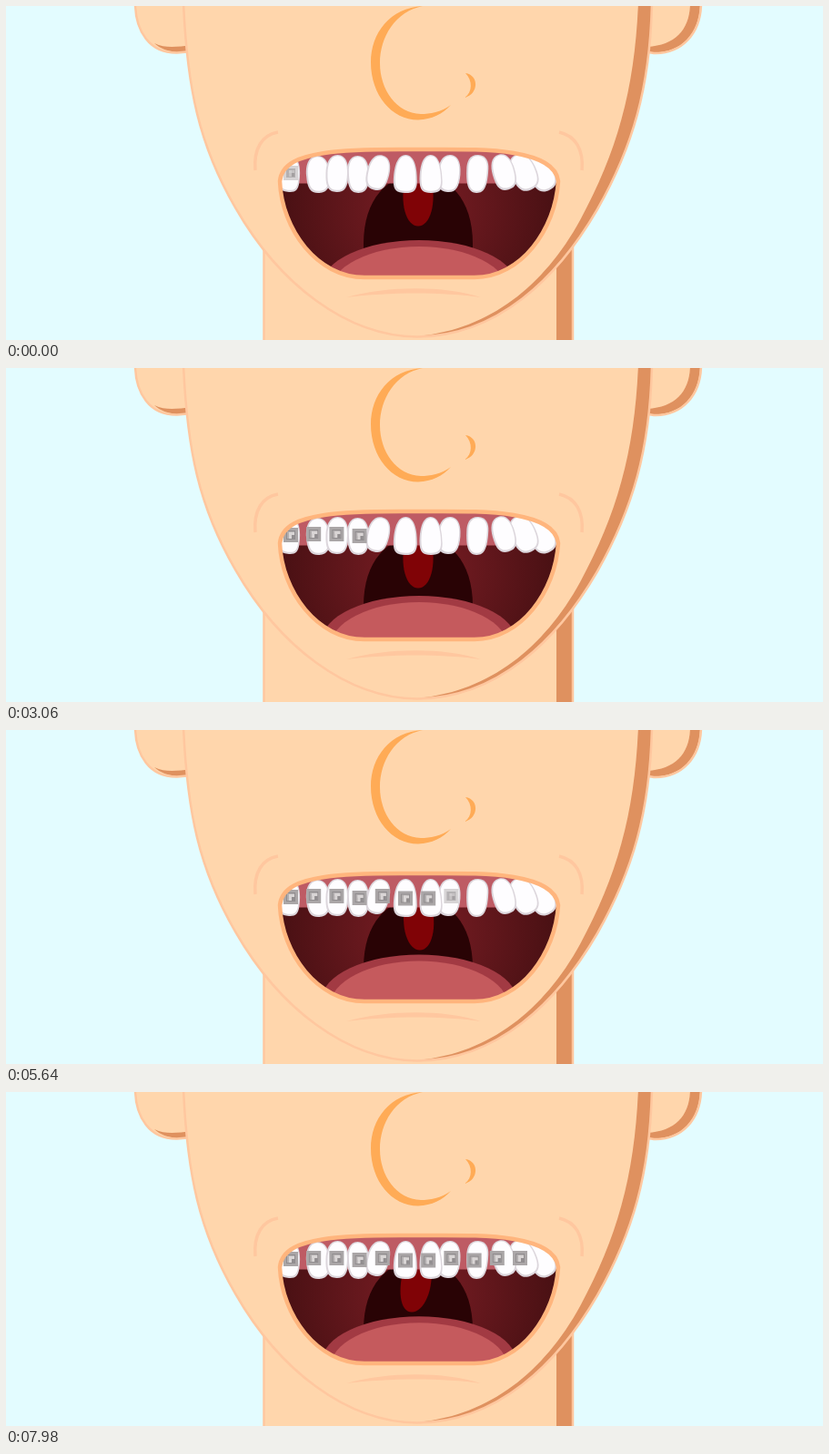
Animation, 898 px wide and 368 px high, one loop 8000 ms. Source, as an HTML page with a canvas:

```html
<!DOCTYPE html>
<html lang="en">
<head>
<meta charset="utf-8">
<title>Braces</title>
<style>
html, body { margin: 0; width: 100%; height: 100%; overflow: hidden; background: #e3fcff; }
canvas { display: block; width: 100%; height: 100%; }
</style>
</head>
<body>
<canvas id="stage" width="898" height="368"></canvas>
<script>
const ctx = document.getElementById('stage').getContext('2d');
const LOOP = 8000;
const SKIN = '#ffd6ac', LINE = '#ffc79f', SHADE = '#df915f', ORANGE = '#ffab56';
const clamp = v => Math.max(0, Math.min(1, v));
const smooth = v => v * v * (3 - 2 * v);
const P = d => new Path2D(d);

const face = P('M195 -4C199 90 212 153 252 222C300 306 374 364 452 364.5C540 364 606 300 650 224C689 155 708 90 710 -4Z');
const faceShade = P('M695 -4C691 92 672 160 631 236C591 309 531 356 455 363.5C540 364 606 300 650 224C689 155 708 90 710 -4Z');
const earLeft = P('M142 -4C142 28 158 52 188 51.5L215 49L215 -4Z');
const earLeftShade = P('M163 41C176 47 187 45 205 43L205 51L188 51C179 50 169 47 163 41Z');
const earRight = P('M764 -4C764 31 742 53 712 52L690 48L690 -4Z');
const earRightShade = P('M752 -4C752 25 737 43 705 45L705 51C742 54 763 31 763 -4Z');
const nose = P('M458 0C422 2 401 30 401 62C401 98 424 125.5 453 125.5C468 125 480 119 489 109C478 117 466 119 456 119C429 118 411 92 411 63C411 34 428 6 458 0Z');
const nostril = P('M505 74C520 76 520 97 504 101C513 95 513 82 505 74Z');
const creases = P('M299 139C281 142 272 158 274 181M608 139C626 143 635 158 633 181');
const chin = P('M374 321C420 308 482 308 522 321C482 315 420 315 374 321Z');
const mouth = P('M301 193C303 173 324 166 350 162C382 157 422 158 453 158C490 158 528 157 558 162C587 167 605 176 607 193C604 246 566 299 515 299L394 299C342 299 303 246 301 193Z');
const throat = P('M393 300L393 262C393 212 420 186 453 186C486 186 513 212 513 262L513 300Z');

const cavity = ctx.createRadialGradient(453, 220, 40, 453, 220, 155);
cavity.addColorStop(0, '#6e1a20');
cavity.addColorStop(1, '#481013');

// centre x, top y, bottom y, half width, tilt in degrees, height of the widest part
const teeth = [
  [312, 166, 205, 11.5, 8, .4], [343, 165, 206, 13, -4, 0], [387, 165, 206, 12, -2, -.1],
  [364, 164, 205, 12.5, 2, 0], [409, 164, 203, 12.5, 14, 0], [439, 164, 206, 13, 1, .4],
  [487, 164, 205, 12.5, 5, 0], [467, 164, 206, 12.5, -1, .4], [518, 164, 206, 12, 3, -.3],
  [588, 163, 205, 14, -28, 0], [569, 162, 204, 14, -24, 0], [547, 163, 203, 12.5, -16, 0]
];
const bracketY = [184, 183, 183, 185, 183, 185.5, 185.5, 183, 185.5, 183, 183];

function fill(path, color) {
  ctx.fillStyle = color;
  ctx.fill(path);
}

function stroke(path, color, width) {
  ctx.strokeStyle = color;
  ctx.lineWidth = width;
  ctx.stroke(path);
}

function rect(color, x, y, w, h) {
  ctx.fillStyle = color;
  ctx.fillRect(x, y, w, h);
}

function ellipse(x, y, rx, ry, color) {
  ctx.fillStyle = color;
  ctx.beginPath();
  ctx.ellipse(x, y, rx, ry, 0, 0, Math.PI * 2);
  ctx.fill();
}

function crown(w, h, widest, color) {
  const mid = h * widest;
  const low = mid + (h - mid) * .75;
  const high = mid - (h + mid) * .5;
  ctx.fillStyle = color;
  ctx.beginPath();
  ctx.moveTo(0, -h);
  ctx.bezierCurveTo(w * .75, -h, w, high, w, mid);
  ctx.bezierCurveTo(w, low, w * .7, h, 0, h);
  ctx.bezierCurveTo(-w * .7, h, -w, low, -w, mid);
  ctx.bezierCurveTo(-w, high, -w * .75, -h, 0, -h);
  ctx.fill();
}

function drawTooth([x, top, bottom, w, tilt, widest]) {
  const h = (bottom - top) / 2;
  ctx.save();
  ctx.translate(x, (top + bottom) / 2);
  ctx.rotate(tilt * Math.PI / 180);
  crown(w, h, widest, '#dcd6dc');
  ctx.translate(.2, -.5);
  crown(w - 1.7, h - 1.7, widest, '#fefdff');
  ctx.restore();
}

function drawBracket(x, y, alpha) {
  ctx.save();
  ctx.globalAlpha = alpha;
  ctx.translate(x, y);
  rect('#aaa6a7', -8, -8, 16, 16);
  rect('#918d8f', -5, -5, 10, 10);
  rect('#b3afb0', -4, -4, 8, 8);
  rect('#d9d5d5', -2, -3, 6, 3);
  rect('#d9d5d5', -2, -3, 3, 7);
  rect('#918d8f', 1, 0, 3, 4);
  ctx.restore();
}

function bracketAlpha(i, t) {
  const start = i ? 1135 + (i - 1) * 715 : -220;
  return smooth(clamp((t - start) / 450));
}

function drawUvula(t) {
  const sway = t > 5500 ? 7 * Math.sin((t - 5500) / 3300 * Math.PI * 2) : 0;
  const tip = 453 + sway;
  ctx.fillStyle = '#800306';
  ctx.beginPath();
  ctx.moveTo(439, 188);
  ctx.bezierCurveTo(432 + sway * .4, 218, tip - 13, 242.5, tip, 242.5);
  ctx.bezierCurveTo(tip + 13, 242.5, 474 + sway * .4, 218, 467, 188);
  ctx.fill();
}

function drawTongue(t) {
  const rise = 11 * Math.sin(Math.PI / 2 * t / 7000);
  const top = 258 - rise;
  ellipse(454, top + 50, 107, 50, '#a23a43');
  ellipse(454, top + 57, 98, 50, '#c55a5d');
}

function drawMouth(t) {
  ctx.save();
  ctx.clip(mouth);
  rect(cavity, 295, 150, 320, 155);
  fill(throat, '#290305');
  drawUvula(t);
  drawTongue(t);
  rect('#be5b64', 295, 150, 320, 45.5);
  teeth.forEach(drawTooth);
  bracketY.forEach((y, i) => drawBracket(313 + i * 25.2, y, bracketAlpha(i, t)));
  ctx.restore();
  stroke(mouth, '#ffb57d', 4.5);
}

function drawHead() {
  rect('#e3fcff', 0, 0, 898, 368);
  rect(SKIN, 283, 230, 341, 140);
  rect(SHADE, 605, 230, 18, 140);
  stroke(P('M283.5 230V372M623 230V372'), LINE, 2.5);

  for (const [ear, shade] of [[earLeft, earLeftShade], [earRight, earRightShade]]) {
    fill(ear, SKIN);
    fill(shade, SHADE);
    stroke(ear, LINE, 2.5);
  }

  fill(face, SKIN);
  fill(faceShade, SHADE);
  stroke(face, LINE, 2.5);
  fill(nose, ORANGE);
  fill(nostril, ORANGE);
  stroke(creases, LINE, 3.5);
  fill(chin, LINE);
}

function frame(now) {
  const t = now % LOOP;
  drawHead();
  drawMouth(t);
  requestAnimationFrame(frame);
}
requestAnimationFrame(frame);
</script>
</body>
</html>
```
